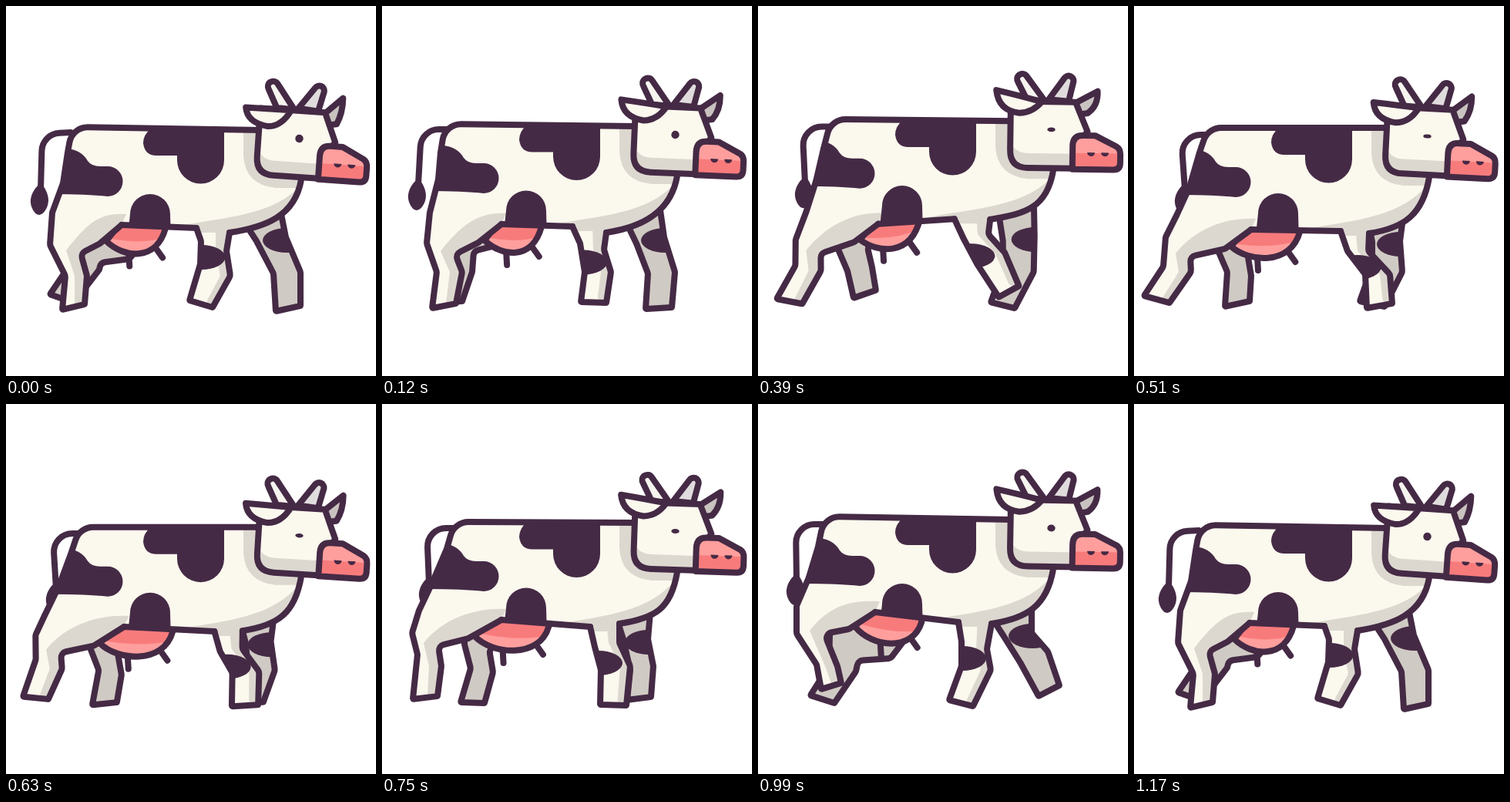
An HTML page with a canvas for the animation above (1200 ms loop, 480 px wide and 480 px high).

```html
<!DOCTYPE html>
<html lang="en">
<head>
<meta charset="utf-8">
<title>Walking cow</title>
<style>
  html, body { margin: 0; width: 100%; height: 100%; overflow: hidden; background: #fff; }
  canvas { display: block; width: 480px; height: 480px; }
</style>
</head>
<body>
<canvas id="stage" width="480" height="480"></canvas>
<script>
const ctx = document.getElementById('stage').getContext('2d');
const INK = '#452a45', CREAM = '#fbf8ee', SHADE = '#dcd8d0', FAR = '#d0cac4';
const PINK = '#ff9f9d', ROSE = '#f87b7c';
const LOOP = 1200, STEP = 30, CYCLE = 1170, STRIDE = CYCLE / 2;
const KEYS = [0, 120, 270, 510, 750, 990];
const LEG_KEYS = [0, 120, 270, 405, 510, 750, 855, 990];

// Periodic cubic interpolation through rows of numbers.
function track(times, period, rows) {
  const n = times.length;
  const at = i => times[(i + n) % n] + period * Math.floor(i / n);
  const row = i => rows[(i + n) % n];
  return t => {
    t %= period;
    let i = n - 1;
    while (times[i] > t) i--;
    const t0 = at(i), span = at(i + 1) - t0, u = (t - t0) / span;
    const slope = (k, j) => (row(k + 1)[j] - row(k - 1)[j]) / (at(k + 1) - at(k - 1)) * span;
    return row(i).map((a, j) => {
      const b = row(i + 1)[j], d = b - a, m = slope(i, j), q = slope(i + 1, j);
      return a + u * (m + u * (3 * d - 2 * m - q + u * (m + q - 2 * d)));
    });
  };
}

// Eye height and head tilt repeat every half cycle.
const bob = track([0, 120, 165, 270, 405, 510], STRIDE,
  [[172, 4], [167, 2.5], [165, 2], [158, 0], [161, 1], [169, 3]]);
const blink = track(KEYS, CYCLE, [[1], [1], [.7], [.5], [.6], [.85]]);

// Point track; each point follows the bob by its own weight.
function joints(times, weights, poses) {
  const rows = poses.map((pose, k) => {
    const lift = bob(times[k])[0];
    return pose.split(/[ ,]/).map((v, j) => j % 2 ? v - weights[j >> 1] * lift : +v);
  });
  const get = track(times, CYCLE, rows);
  return t => {
    const v = get(t), lift = bob(t)[0];
    return weights.map((w, i) => [v[2 * i], v[2 * i + 1] + w * lift]);
  };
}

const FRONT = [1, .9, .4, 0, 0, .4, .9, 1];
const HIND = [1, 1, .7, .3, 0, 0, .3, .7, .9, 1];

const nearFront = joints(LEG_KEYS, FRONT, [
  '247,288 253,305 252,335 238,382 268,391 291,350 286,318 290,294',
  '247,286 257,308 263,345 258,384 291,385 297,345 288,316 291,294',
  '248,278 258,300 270,326 305,370 328,357 303,312 287,290 294,275',
  '256,277 268,303 286,336 312,379 339,365 322,322 300,298 302,278',
  '268,292 277,318 300,348 302,392 335,386 332,348 304,318 305,295',
  '270,289 276,315 284,345 283,390 317,391 322,340 308,310 308,285',
  '266,280 272,305 279,342 268,388 300,392 316,342 306,312 307,280',
  '260,283 264,308 264,340 248,384 279,392 302,345 297,318 303,285'
]);
const farFront = joints(LEG_KEYS, FRONT, [
  '312,285 325,305 347,347 350,396 382,389 382,345 363,300 357,270',
  '318,283 330,308 345,347 342,393 376,391 380,345 366,300 361,265',
  '328,265 333,290 338,335 323,388 354,392 373,345 371,290 364,240',
  '312,280 316,306 316,340 300,384 331,392 356,345 357,300 357,262',
  '305,285 309,306 309,338 293,383 325,390 348,345 345,305 349,275',
  '305,280 313,305 322,345 318,384 349,380 352,340 345,305 348,270',
  '303,275 312,298 326,330 357,370 380,358 358,318 350,298 352,260',
  '305,280 318,300 340,335 364,379 391,365 376,321 355,297 355,262'
]);
const nearHind = joints(KEYS, HIND, [
  '74,230 60,268 57,310 77,350 73,394 102,387 105,350 97,321 122,308 150,284',
  '73,225 62,268 58,308 71,345 65,392 96,386 104,345 95,322 125,307 155,283',
  '77,225 68,268 57,310 62,337 43,386 76,387 92,343 91,320 130,302 160,280',
  '72,235 56,270 41,300 38,338 13,376 46,385 74,345 73,325 118,315 152,290',
  '66,230 48,268 39,297 46,325 40,383 72,379 77,340 73,314 112,304 155,280',
  '66,225 50,262 50,298 76,338 82,370 108,362 103,340 86,298 118,292 152,270'
]);
const farHind = joints(KEYS, HIND, [
  '110,250 95,285 85,312 80,340 57,374 88,385 121,342 123,333 160,328 185,298',
  '110,250 95,275 88,300 88,330 74,385 104,383 117,345 119,318 150,310 190,285',
  '110,240 95,275 97,315 107,342 121,369 147,358 139,330 132,305 160,300 195,280',
  '115,250 106,285 108,315 121,345 118,390 150,383 152,350 147,320 165,315 195,285',
  '112,245 108,275 107,312 115,343 102,387 133,388 144,348 139,318 165,305 195,280',
  '110,240 98,270 93,300 92,340 68,378 99,388 127,347 130,333 172,330 206,285'
]);
// Rump, back corner, then tail root, bend and end.
const rear = joints(KEYS, [1, 1, 1, 1, 1], [
  '80,190 86,157 84,164 47,166 45,238',
  '76,190 82,153 84,160 51,160 47,232',
  '84,185 92,142 94,152 53,152 54,226',
  '85,190 96,158 95,167 61,167 66,238',
  '84,188 94,153 96,161 58,161 61,232',
  '78,185 86,146 90,156 49,156 50,228'
]);

const shift = ([x, y], dx, dy = 0) => [x + dx, y + dy];
const mix = (a, b, k) => a + (b - a) * k;

// Polyline with softened corners.
function soft(pts, r = 7, path = new Path2D()) {
  path.moveTo(...pts[0]);
  for (let i = 1; i < pts.length - 1; i++) path.arcTo(...pts[i], ...pts[i + 1], r);
  path.lineTo(...pts[pts.length - 1]);
  return path;
}
function limb(pts, foot) {
  const path = new Path2D();
  path.moveTo(...pts[0]);
  for (let i = 1; i < pts.length - 1; i++) {
    path.arcTo(...pts[i], ...pts[i + 1], i === foot || i === foot + 1 ? 1 : 8);
  }
  path.lineTo(...pts[pts.length - 1]);
  return path;
}
function fill(path, color) { ctx.fillStyle = color; ctx.fill(path); }
function line(path, width = 8) { ctx.lineWidth = width; ctx.stroke(path); }
function shape(path, color, width) { fill(path, color); line(path, width); }
function blob(x, y, rx, ry, color = INK) {
  ctx.fillStyle = color;
  ctx.beginPath();
  ctx.ellipse(x, y, rx, ry, 0, 0, 2 * Math.PI);
  ctx.fill();
}
function clipped(path, draw) {
  ctx.save();
  ctx.clip(path);
  draw();
  ctx.restore();
}

function drawTail(root, bend, end) {
  line(soft([root, bend, end], 24));
  const [x, y] = end;
  fill(new Path2D(`M${x},${y - 8}C${x + 5},${y - 4} ${x + 10},${y + 6} ${x + 10},${y + 14}
    C${x + 10},${y + 24} ${x + 3},${y + 33} ${x - 2},${y + 33}
    C${x - 8},${y + 33} ${x - 14},${y + 22} ${x - 13},${y + 13}
    C${x - 12},${y + 4} ${x - 6},${y - 4} ${x},${y - 8}Z`), INK);
}

function drawUdder(left, right) {
  const [lx, ly] = left, [rx, ry] = right, mid = (ly + ry) / 2;
  const teat = mix(lx, rx, .38), teat2 = mix(lx, rx, .82);
  line(new Path2D(`M${teat},${mid + 24}l1,17M${teat2},${mid + 16}l10,14`));
  const bag = new Path2D(`M${lx},${ly}C${lx + 22},${mid + 30} ${rx - 12},${mid + 36} ${rx},${ry}
    L${rx},${ry - 14}L${lx + 20},${ly - 26}Z`);
  fill(bag, PINK);
  clipped(bag, () => fill(new Path2D(`M${lx},${ly - 40}H${rx + 5}V${ry + 10}
    Q${mix(lx, rx, .65)},${mid + 14} ${lx + 8},${ly - 3}Z`), ROSE));
  line(bag);
}

function drawSpots(top, eye) {
  const y = top + 70;
  fill(new Path2D(`M60,${y - 42}H80Q98,${y - 40} 106,${y - 26}Q111,${y - 19} 122,${y - 19}H132
    A19.5 19.5 0 0 1 132,${y + 20}Q104,${y + 17} 60,${y + 17}Z`), INK);
  const b = (top + eye - 11) / 2;
  fill(new Path2D(`M188,${b}Q178,${b + 8} 178,${b + 19}Q180,${b + 35} 195,${b + 35}H222V${b + 41}
    A30.5 30.5 0 0 0 283,${b + 41}V${b}Z`), INK);
  const c = b + 86;
  fill(new Path2D(`M157,${c + 62}L161,${c + 25}A26 26 0 0 1 213,${c + 25}L214,${c + 62}Z`), INK);
}

function drawHead(eye, tilt, lid) {
  ctx.save();
  ctx.translate(380.5, eye);
  ctx.rotate(tilt * Math.PI / 180);
  ctx.translate(-380, -158);
  shape(new Path2D('M348,120L336,97A6.5 6.5 0 0 1 347,89L371,121Z'), '#f6f4ef');
  shape(new Path2D('M376,119L396,91A6.5 6.5 0 0 1 408,95L402,121Z'), '#e0dcdd');
  const ex = 441 - 2 * tilt, ey = 109 - 1.8 * tilt;
  shape(new Path2D(`M411,123L${ex},${ey}Q${ex + 1},${ey + 19} 427,136L416,138Z`), '#c9c3c0');
  const skull = new Path2D('M327,122V185Q327,208 350,208H412V178L427,160L411,122Z');
  fill(skull, CREAM);
  clipped(skull, () => fill(new Path2D('M327,170Q330,189 350,189H415V212H327Z'), SHADE));
  line(skull);
  const tip = 104 + 4.6 * tilt, low = 135 + 2.5 * tilt;
  shape(new Path2D(`M308,${tip}Q311,${low - 3} 338,${low}Q356,${low - 1} 367,122Q340,${(tip + 122) / 2} 308,${tip}Z`), CREAM);
  const muzzle = new Path2D('M408,209V179Q408,165 421,165H437L465,179Q470,182 470,189V200Q470,209 461,209Z');
  fill(muzzle, PINK);
  clipped(muzzle, () => { ctx.fillStyle = ROSE; ctx.fillRect(400, 188, 80, 30); });
  line(muzzle);
  fill(new Path2D('M427,187h10a5 5 0 0 1 -10,0ZM445,187h10a5 5 0 0 1 -10,0Z'), INK);
  blob(380, 158, 5.2, 5.2 * lid, INK);
  ctx.restore();
}

function draw(t) {
  const [eye, tilt] = bob(t);
  const [rump, corner, root, bend, end] = rear(t);
  const front = nearFront(t), hind = nearHind(t), back = farFront(t), rearFar = farHind(t);
  const chest = [383, eye + 53], neck = [330, eye - 11];
  const armpit = front[7], belly = front[0], groin = hind[9];

  ctx.fillStyle = '#fff';
  ctx.fillRect(0, 0, 480, 480);
  ctx.strokeStyle = INK;
  ctx.lineJoin = ctx.lineCap = 'round';

  shape(limb(rearFar, 4), FAR);
  const far = limb(back, 3);
  fill(far, FAR);
  clipped(far, () => blob(back[6][0] + 1, back[6][1] + 4, 31, 16));
  line(far);
  drawTail(root, bend, end);
  drawUdder(shift(hind[8], 8, -3), [207 + (belly[0] - 247) * .4, belly[1]]);

  // One silhouette: trunk plus both near legs, all wound the same way.
  const bust = [chest[0] - 8, chest[1] + 48, armpit[0] + 46, armpit[1] - 7, ...armpit];
  const body = soft([hind[0], rump, corner, neck], 24);
  body.lineTo(...chest);
  body.bezierCurveTo(...bust);
  body.lineTo(...belly);
  body.lineTo(...groin);
  body.closePath();
  const wider = (leg, dx) => {
    const n = leg.length - 1;
    return [shift(leg[n], 0, -20), ...leg.slice().reverse(), shift(leg[0], dx, -20)];
  };
  body.addPath(limb(wider(front, 0), 4));
  body.addPath(limb(wider(hind, 22), 5));
  fill(body, CREAM);

  clipped(body, () => {
    const h = belly[1];
    fill(new Path2D(`M308,${eye - 20}V${eye + 22}Q310,${eye + 60} 350,${eye + 64}H390V${eye - 20}Z`), SHADE);
    fill(new Path2D(`M205,${h + 2}C260,${h - 14} 345,${h - 10} ${chest[0]},${chest[1] + 6}
      V${h + 6}H205Z`), SHADE);
    fill(soft([shift(armpit, -18, -10), shift(front[6], -14), shift(front[5], -13), shift(front[4], -12),
      shift(front[4], 4), front[5], front[6], armpit]), SHADE);
    const [gx, gy] = groin, [kx, ky] = hind[7];
    const thigh = new Path2D();
    thigh.moveTo(gx + 6, gy - 14);
    thigh.bezierCurveTo(gx - 30, gy - 16, kx + 8, ky - 38, kx - 19, ky - 4);
    [shift(hind[6], -16), shift(hind[5], -13), hind[5], hind[6], hind[7], hind[8], groin]
      .forEach(p => thigh.lineTo(...p));
    fill(thigh, SHADE);
    blob((front[1][0] + front[2][0]) / 2 + 1, (front[1][1] + front[2][1]) / 2 + 6, 31, 16);
    drawSpots(corner[1], eye);
  });

  line(soft([hind[0], rump, corner, neck], 24));
  const under = new Path2D();
  under.moveTo(...chest);
  under.bezierCurveTo(...bust);
  under.moveTo(...belly);
  under.lineTo(...groin);
  line(under);
  line(limb(front, 3));
  line(limb(hind, 4));
  drawHead(eye, tilt, blink(t)[0]);
}

const start = performance.now();
function tick() {
  const t = (performance.now() - start) % LOOP;
  draw(Math.floor(t / STEP) * STEP % CYCLE);
  requestAnimationFrame(tick);
}
tick();
</script>
</body>
</html>
```
